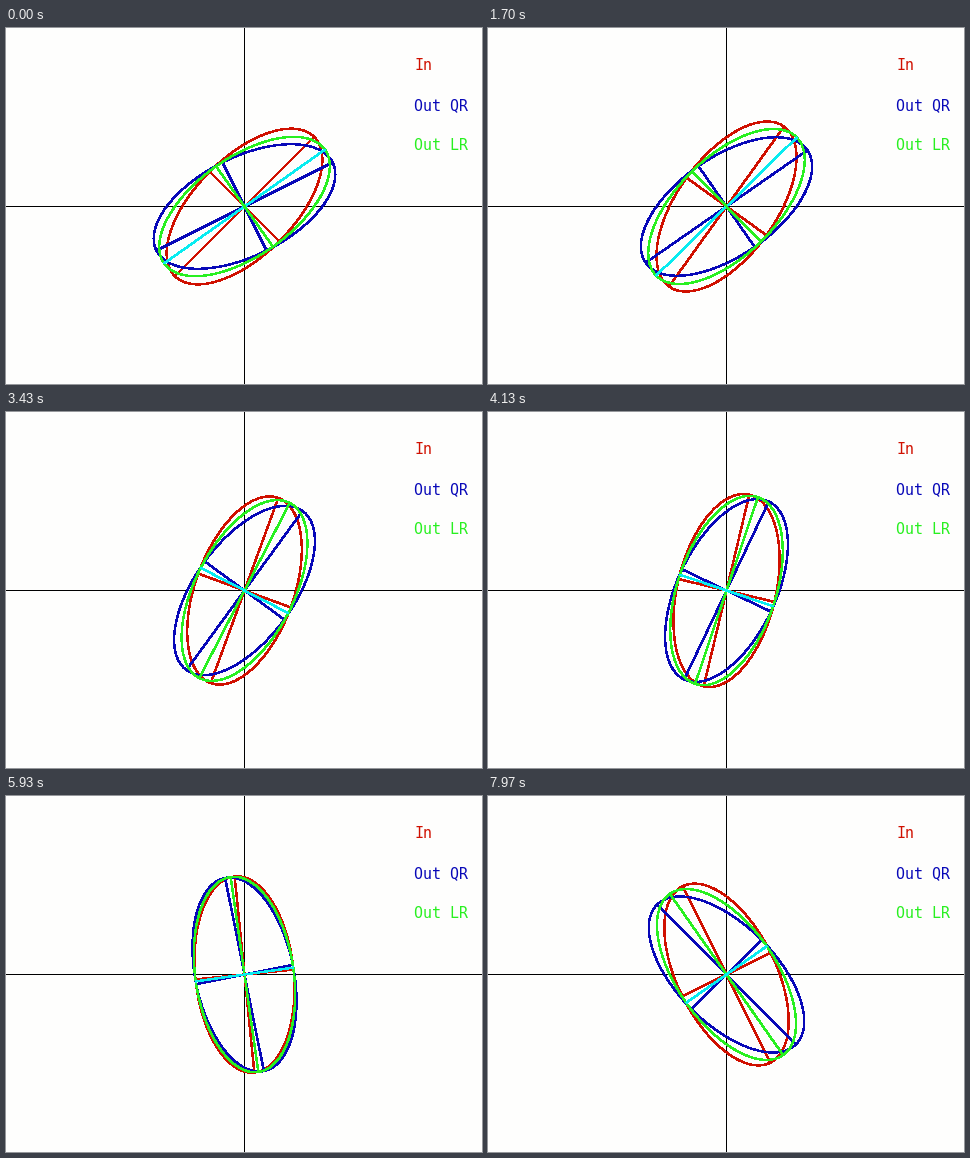
A matplotlib script that plays this animation: 476x356 px, repeating every 8 s.

```python
import numpy as np
import matplotlib.pyplot as plt
from matplotlib.animation import FuncAnimation

W, H, DPI = 476, 356, 100
LOOP, FRAMES = 8000, 250
CX, CY = 238.5, 178.5
MAJOR, MINOR = 98.5, 49.25

RED, BLUE, GREEN, CYAN = "#d01000", "#0808b8", "#28f020", "#08ecf0"

# Tilt of the input ellipse in degrees at a few times in seconds.
TIMES = np.array([0, 0.93, 2.43, 3.43, 4.83, 6.97, 8.0])
TILTS = np.array([45, 48.5, 61, 70, 83.6, 107.2, 116.7])
SPEEDS = np.gradient(TILTS, TIMES, edge_order=2)


def px(n):
    return n * 72 / DPI


def tilt_at(t):
    """Smooth Hermite path through the tilt keys."""
    i = min(np.searchsorted(TIMES, t, side="right") - 1, len(TIMES) - 2)
    step = TIMES[i + 1] - TIMES[i]
    u = (t - TIMES[i]) / step
    ease = u * u * (3 - 2 * u)
    return (TILTS[i] * (1 - ease) + TILTS[i + 1] * ease
            + step * u * (1 - u) * (SPEEDS[i] * (1 - u) - SPEEDS[i + 1] * u))


def iterate(theta, ratio):
    """Eigenvector angle after one step of the eigenvalue iteration."""
    return np.arctan2(ratio * np.sin(theta), np.cos(theta))


fig = plt.figure(figsize=(W / DPI, H / DPI), dpi=DPI, facecolor="#fefefd")
ax = fig.add_axes([0, 0, 1, 1])
ax.set_xlim(0, W)
ax.set_ylim(H, 0)
ax.axis("off")

# Unsnapped, so each axis fills exactly one row or column of pixels.
for xs, ys in (([CX, CX], [0, H]), ([0, W], [CY, CY])):
    ax.plot(xs, ys, color="black", lw=px(1), snap=False)

for label, color, y in (("In", RED, 42), ("Out QR", BLUE, 82),
                        ("Out LR", GREEN, 122)):
    ax.text(408, y, label, color=color, family="DejaVu Sans Mono",
            fontsize=px(15), ha="left", va="baseline")


class Ellipse:
    turn = np.linspace(0, 2 * np.pi, 361)

    def __init__(self, color):
        self.lines = [
            ax.plot([], [], color=color, lw=px(1.4), aa=False, snap=False,
                    solid_capstyle="butt")[0]
            for _ in range(3)]
        self.curve, self.long, self.short = self.lines

    def place(self, theta):
        c, s = np.cos(theta), np.sin(theta)

        def put(line, u, v):
            line.set_data(CX + u * c - v * s, CY - u * s - v * c)

        ends, zero = np.array([-1, 1]), np.zeros(2)
        put(self.curve, MAJOR * np.cos(self.turn), MINOR * np.sin(self.turn))
        put(self.long, MAJOR * ends, zero)
        put(self.short, zero, MINOR * ends)


matrix, qr_step, lr_step = ellipses = [Ellipse(c) for c in (RED, BLUE, GREEN)]


def draw(k):
    theta = np.radians(tilt_at(k * LOOP / FRAMES / 1000))
    lr_theta = iterate(theta, np.sqrt(MINOR / MAJOR))
    matrix.place(theta)
    qr_step.place(iterate(theta, MINOR / MAJOR))
    lr_step.place(lr_theta)

    # The flatter of the two LR axes is cyan.
    flat = abs(np.cos(lr_theta)) > abs(np.sin(lr_theta))
    lr_step.long.set_color(CYAN if flat else GREEN)
    lr_step.short.set_color(GREEN if flat else CYAN)
    return [line for e in ellipses for line in e.lines]


anim = FuncAnimation(fig, draw, frames=FRAMES, init_func=lambda: draw(0),
                     interval=LOOP // FRAMES, repeat=True, repeat_delay=0,
                     blit=False)
plt.show()
```
